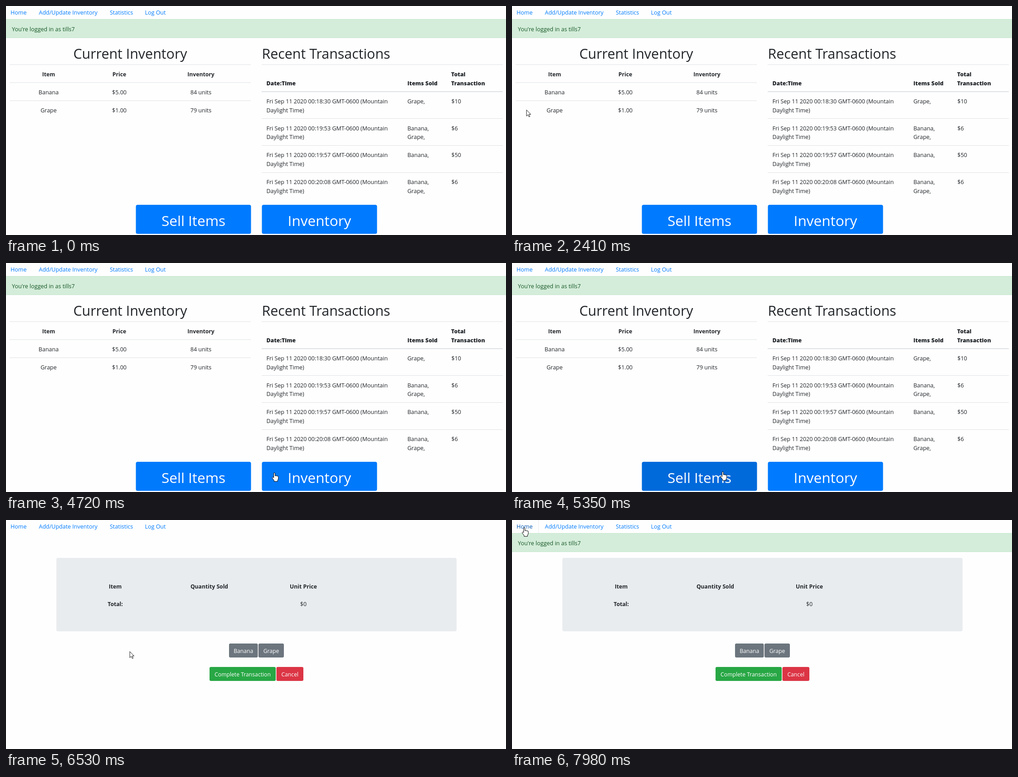
An HTML page that plays this animation: 1103x508 px, repeating every 8 s.

```html
<!DOCTYPE html>
<html lang="en">
<head>
<meta charset="utf-8">
<title>Inventory</title>
<style>
html, body { margin: 0; width: 100%; height: 100%; overflow: hidden; background: #fefefe; }
svg { display: block; width: 1103px; height: 508px; font: 12.5px "Open Sans", "Noto Sans", sans-serif; fill: #212529; }
.mid { text-anchor: middle; }
.bold { font-size: 12.2px; font-weight: 700; }
.black { font-size: 12.3px; font-weight: 800; }
.title { font-size: 30.4px; }
.big { font-size: 31.5px; }
.btn { font-size: 12.2px; }
.white { fill: #fff; }
.link { fill: #007bff; }
.note { fill: #155724; }
.cursor { fill: #fff; stroke: #000; stroke-linejoin: round; }
</style>
</head>
<body>
<svg id="stage" viewBox="0 0 1103 508"></svg>
<script>
const text = (x, y, s, cls = '') => `<text x="${x}" y="${y}" class="${cls}">${s}</text>`;
const rect = (x, y, w, h, fill, r = 0, extra = '') =>
  `<rect x="${x}" y="${y}" width="${w}" height="${h}" rx="${r}" fill="${fill}" ${extra}/>`;
const rule = (x, y, h = 1) => rect(x, y, 532, h, '#dee2e6');
const button = (x, y, w, fill, label) =>
  rect(x, y, w, 31, fill, 3) + text(x + w / 2, y + 21, label, 'mid btn white');
const bigButton = (id, x, label) =>
  rect(x, 441, 254, 64.5, '#007bff', 4, `id="${id}"`) + text(x + 127, 487.5, label, 'mid big white');

const nav = text(10, 19, 'Home', 'link') + text(72.5, 19, 'Add/Update Inventory', 'link') +
  text(229, 19, 'Statistics', 'link') + text(306.5, 19, 'Log Out', 'link');

const alertBar = rect(-1, 29.5, 1105, 41, '#d4edda', 0, 'stroke="#c3e6cb"') +
  text(13, 56, "You're logged in as tills7", 'note');

const stock = [['Item', 'Price', 'Inventory'], ['Banana', '$5.00', '84 units'], ['Grape', '$1.00', '79 units']]
  .map((row, i) => rule(8, 129.5 + i * 40) + row.map((s, c) =>
    text([94, 250, 430][c], 156 + i * 40, s, i ? 'mid' : 'mid bold')).join('')).join('');

const line = 19.7;
const sales = [['18:30', 'Grape,', '', '$10'], ['19:53', 'Banana,', 'Grape,', '$6'],
  ['19:57', 'Banana,', '', '$50'], ['20:08', 'Banana,', 'Grape,', '$6']]
  .map(([time, a, b, total], i) => {
    const y = 216 + i * 59.7;
    return (i ? rule(564, Math.round(y - 26.5)) : rule(564, 189, 2)) +
      text(574.5, y, `Fri Sep 11 2020 00:${time} GMT-0600 (Mountain`) +
      text(574.5, y + line, 'Daylight Time)') +
      text(885.5, y, a) + text(885.5, y + line, b) + text(982.5, y, total);
  }).join('');

const home = text(274, 117, 'Current Inventory', 'mid title') + stock +
  text(564.5, 117, 'Recent Transactions', 'title') + rule(564, 129.5) +
  text(574.5, 175.5, 'Date:Time', 'black') + text(885.5, 175.5, 'Items Sold', 'black') +
  text(982, 156, 'Total', 'black') + text(982, 175.5, 'Transaction', 'black') + sales +
  rect(285.5, 439.7, 256, 67, 'none', 5, 'id="ring" stroke="#80bdff" stroke-width="2.6"') +
  bigButton('sell', 286.5, 'Sell Items') + bigButton('inv', 564.5, 'Inventory');

const till = rect(111, 84, 883, 163, '#e9ecef', 4) +
  text(241, 152, 'Item', 'mid bold') + text(448.5, 152, 'Quantity Sold', 'mid bold') +
  text(656, 152, 'Unit Price', 'mid bold') + text(241, 191, 'Total:', 'mid bold') + text(656, 191, '$0', 'mid') +
  button(492, 274, 63.5, '#6c757d', 'Banana') + button(557, 274, 56, '#6c757d', 'Grape') +
  button(449, 326, 146, '#28a745', 'Complete Transaction') + button(596.5, 326, 59.5, '#dc3545', 'Cancel') +
  rect(58, 0, 1, 29, '#e9ecef', 0, 'id="edge"');

const arrow = 'M.5 .5V14.2L3.7 11.2L6 16L8 15.1L5.8 10.4H10Z';
const hand = 'M-1.3 11V1.5A1.5 1.5 0 0 1 1.7 1.5V7A1.3 1.3 0 0 1 4.2 7.3A1.3 1.3 0 0 1 6.7 8A1.2 1.2 0 0 1 8.9 9' +
  'V13.5L7.2 17V19.3H-.3V17.3L-4.4 11.8C-5.3 10-3.4 9-2.4 10Z';

document.getElementById('stage').innerHTML =
  `<g id="nav">${nav}</g><g id="alert">${alertBar}</g><g id="home">${home}</g><g id="till">${till}</g>` +
  `<g id="cursor" class="cursor"><path id="arrow" d="${arrow}" stroke-width=".9"/><path id="hand" d="${hand}"/></g>`;

const el = id => document.getElementById(id);
const show = (id, on) => { el(id).style.display = on ? '' : 'none'; };
const clamp = v => Math.max(0, Math.min(1, v));
const homeLink = document.querySelector('#nav text');

// Each move goes on from the last one; bow bends its path sideways
const begin = { x: 626, y: 474 };
const moves = [
  { from: 240, to: 1010, x: 1024, y: 132, bow: 90 },
  { from: 1080, to: 1780, x: 756, y: 363, bow: 110 },
  { from: 1910, to: 2160, x: 31.5, y: 230, bow: 0 },
  { from: 2410, to: 3110, x: 370, y: 205, bow: 145 },
  { from: 3250, to: 3490, x: 377, y: 379, bow: 0 },
  { from: 3490, to: 4010, x: 415, y: 470, bow: 0 },
  { from: 4320, to: 4840, x: 628, y: 464.5, bow: 0 },
  { from: 5080, to: 5350, x: 463.5, y: 463, bow: 0 },
  { from: 6020, to: 6530, x: 264.5, y: 284, bow: 0 },
  { from: 6840, to: 7610, x: 44, y: 20, bow: 12 },
  { from: 7680, to: 7940, x: 27, y: 17, bow: -9 }
];
const tick = 64;

function pointer(t) {
  const i = moves.findLastIndex(m => m.from <= t);
  if (i < 0) return begin;
  const a = moves[i - 1] || begin, b = moves[i];
  const p = clamp(Math.floor((t - b.from) / tick) * tick / (b.to - b.from));
  const s = p * p * (3 - 2 * p);
  const dx = b.x - a.x, dy = b.y - a.y;
  const side = b.bow * Math.sin(Math.PI * s) / Math.hypot(dx, dy);
  return { x: a.x + dx * s + dy * side, y: a.y + dy * s - dx * side };
}

const hover = (t, on, off) => clamp((t - on) / 150) - clamp((t - off) / 150);
const blue = k => `rgb(0 ${123 - 18 * k} ${255 - 38 * k})`;

function draw(t) {
  const { x, y } = pointer(t);
  const first = t < 5840, second = t >= 6020;
  const onButton = first && t > 3250 && y > 441 && ((x > 287 && x < 540) || x > 564);
  const onLink = second && x < 58 && y < 29;
  const press = clamp((t - 5530) / 150);

  show('nav', first || second);
  show('home', first);
  show('till', second);
  show('edge', onLink);
  el('alert').style.opacity = first ? 1 : clamp((t - 6777) / 150);
  homeLink.style.fill = onLink ? '#0056b3' : '';

  el('sell').style.fill = blue(hover(t, 3760, 4580) + hover(t, 5210, 9000) + press * .36);
  el('inv').style.fill = blue(hover(t, 4704, 5147));
  el('ring').style.opacity = press;

  show('cursor', t >= 240);
  show('hand', onButton || onLink);
  show('arrow', !onButton && !onLink);
  el('cursor').setAttribute('transform', `translate(${x.toFixed(1)} ${y.toFixed(1)})`);
}

function frame() {
  draw(performance.now() % 8000);
  requestAnimationFrame(frame);
}
frame();
</script>
</body>
</html>
```
